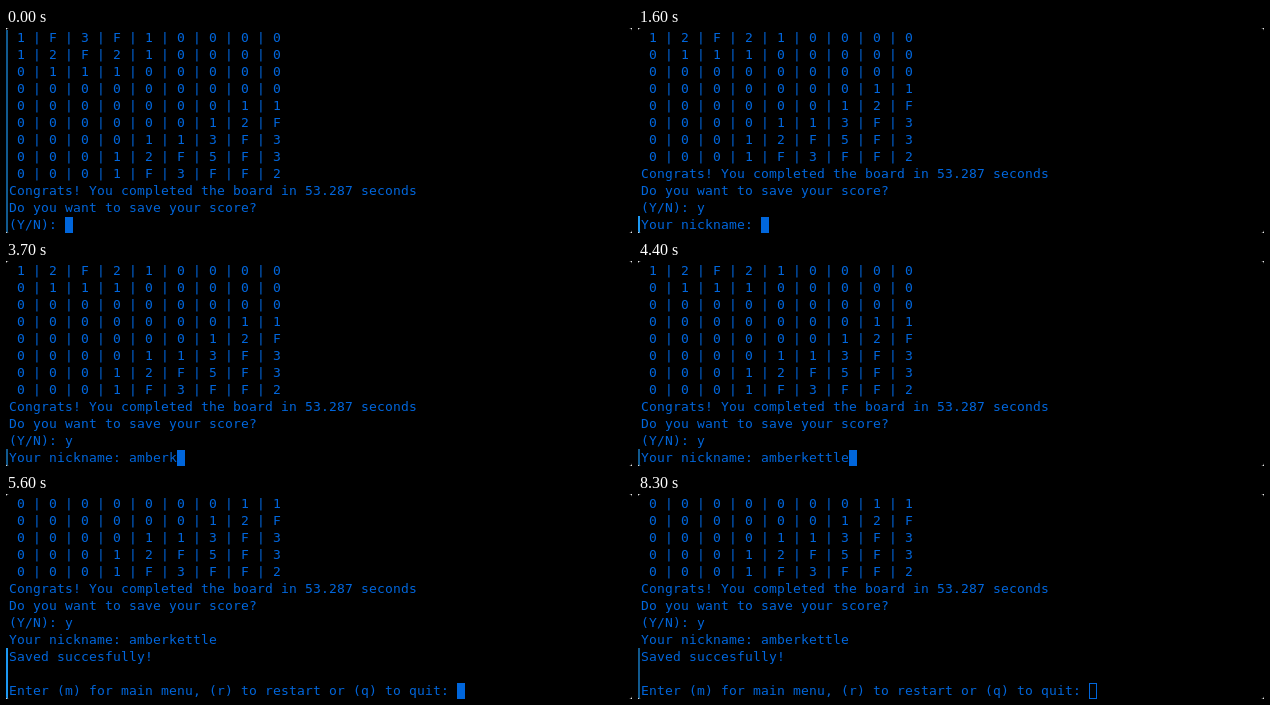
Animation of 626 by 205 pixels, one loop 8400 ms. Source, as an HTML page:

```html
<!DOCTYPE html>
<html lang="en">
<head>
<meta charset="utf-8">
<title>Minesweeper terminal</title>
<style>
  html, body { margin: 0; width: 100%; height: 100%; overflow: hidden; background: #fff; }
  #term {
    position: relative; width: 626px; height: 205px; overflow: hidden;
    background: #000; border-radius: 3px; color: #0066dc;
  }
  #text {
    position: absolute; left: 3px; top: 1px; margin: 0;
    font: 13px/17px "DejaVu Sans Mono", monospace; font-variant-ligatures: none;
  }
  #text div { display: flex; height: 17px; }
  #text span { width: 8px; }
  #cursor {
    position: absolute; top: 189px; width: 8px; height: 16px;
    box-sizing: border-box; border: 1px solid #0066dc; background: #0066dc;
  }
  #cursor.hollow { background: none; }
  #fresh { position: absolute; left: 0; bottom: 0; width: 2px; background: #1d99f3; }
  #fresh.dim { background: #115a8f; }
</style>
</head>
<body>
<div id="term">
  <pre id="text"></pre>
  <div id="fresh"></div>
  <div id="cursor"></div>
</div>
<script>
const LOOP = 8400, ROWS = 12, CELL = 8, LEFT = 3;
const NICK = "amberkettle";
const board = "1F3F10000 12F210000 011100000 000000000 000000011 00000012F 0000113F3 00012F5F3 0001F3FF2"
  .split(" ").map(row => " " + [...row].join(" | "));
const history = [...board,
  "Congrats! You completed the board in 53.287 seconds",
  "Do you want to save your score?"];
const yesNo = "(Y/N): ", nickname = "Your nickname: ";

const answer = typed => [...history, yesNo + typed];
const naming = count => [...answer("y"), nickname + NICK.slice(0, count)];
const entered = [...naming(NICK.length), ""];
const saved = [...naming(NICK.length), "Saved succesfully!", "",
  "Enter (m) for main menu, (r) to restart or (q) to quit: "];

// [start ms, lines, top of the new-lines marker, marker dimmed, cursor hollow]
const steps = [
  [0, answer(""), 2, true],
  [300, answer("y"), 2, true],
  [1600, naming(0), 188, false],
  [1800, naming(0), 188, true],
  ...[[2600, 1], [3100, 4], [3300, 5], [3700, 6], [3800, 7], [3900, 8],
      [4100, 9], [4200, 10], [4400, 11]].map(([at, n]) => [at, naming(n), 188, true]),
  [5500, entered, 188, false],
  [5600, saved, 154, false],
  [5900, saved, 154, true],
  [8300, saved, 154, true, true]
];

const [text, fresh, cursor] = ["text", "fresh", "cursor"].map(id => document.getElementById(id));
let shown;

// Each character sits in its own cell of the terminal grid.
function makeRow(line) {
  const row = document.createElement("div");
  row.append(...[...line].map(char => {
    const cell = document.createElement("span");
    cell.textContent = char;
    return cell;
  }));
  return row;
}

function show(step) {
  if (step === shown) return;
  shown = step;
  const [, lines, top, dim, hollow] = step;
  text.replaceChildren(...lines.slice(-ROWS).map(makeRow));
  fresh.style.top = top + "px";
  fresh.classList.toggle("dim", dim);
  cursor.style.left = LEFT + CELL * lines.at(-1).length + "px";
  cursor.classList.toggle("hollow", !!hollow);
}

const start = performance.now();
function tick() {
  const t = (performance.now() - start) % LOOP;
  show(steps.findLast(([at]) => at <= t));
  requestAnimationFrame(tick);
}
tick();
</script>
</body>
</html>
```
